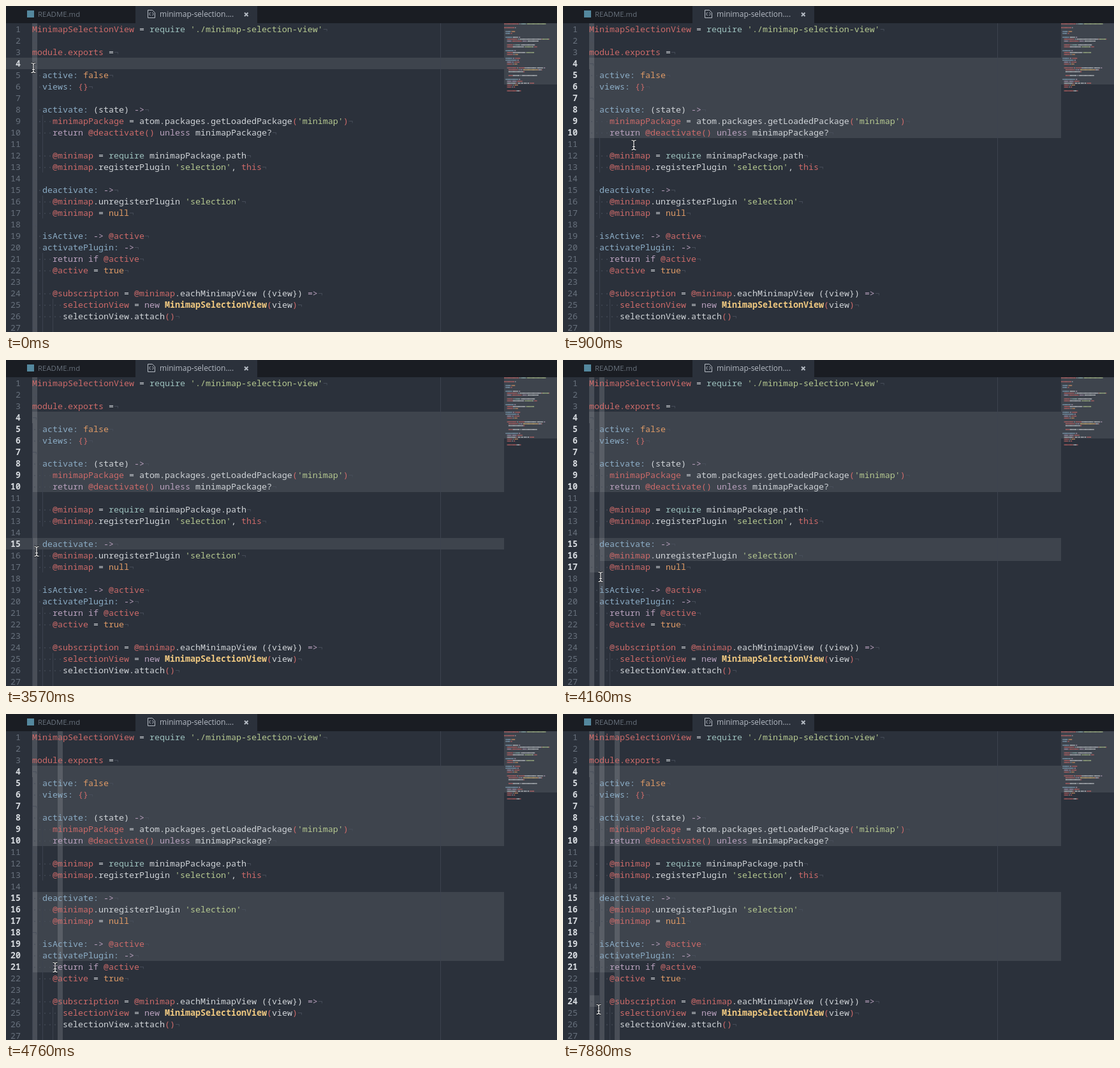
Animation of 864 by 511 pixels, one loop 8 s. Source, as an HTML page with a canvas:

```html
<!DOCTYPE html>
<html lang="en">
<head>
<meta charset="utf-8">
<title>Editor selections</title>
<style>
  html, body { margin: 0; width: 100%; height: 100%; overflow: hidden; background: #2b313b; }
  #stage { position: relative; width: 864px; height: 511px; overflow: hidden; background: #2b313b; }
  #stage * { position: absolute; left: 0; top: 0; margin: 0; }
  #stage pre * { position: static; }
  #stage > pre { top: 27px; font: 13.333px/18px 'Noto Sans Mono', monospace; color: #d0d4d8; }
  #tabs { width: 864px; height: 27px; background: #1a1d23; font: 12px/26px 'Open Sans', sans-serif; white-space: nowrap; }
  #stage #badge { left: 33px; top: 7px; width: 11px; height: 11px; background: #54889e; }
  #stage #readme { left: 50px; font-size: 11.4px; color: #69727d; }
  #stage #tab { left: 203px; width: 191px; height: 27px; background: #2b313b; color: #b4bac3; }
  #stage #title { left: 38px; }
  #tab svg { fill: none; stroke: #b4bac3; }
  #stage #numbers { left: 7px; color: #68717d; }
  #numbers b { color: #d5d9de; }
  #stage #code { left: 41px; }
  #stage #map { left: 781px; top: 27px; }
  .hl { background: #fff; opacity: .09; }
  .column { background: #fff; opacity: .14; }
  .guide { width: 1px; background: #3c424e; }
  .str { color: #b5c890; }
  .red { color: #cc6a69; }
  .word { color: #b8a0bd; }
  .fn { color: #9cc0bd; }
  .key { color: #8bacc5; }
  .lit { color: #de9a66; }
  .type { color: #f0c981; font-weight: bold; }
  .inv { color: #484f5b; }
</style>
</head>
<body>
<div id="stage">
  <div id="marks"></div>
  <div id="guides"></div>
  <pre id="numbers"></pre>
  <pre id="code"></pre>
  <div class="hl" style="left:781px;top:27px;width:83px;height:96px"></div>
  <canvas id="map" width="83" height="484"></canvas>
  <div id="tabs">
    <span id="badge"></span><span id="readme">README.md</span>
    <div id="tab">
      <svg width="191" height="27">
        <path d="M19.5 6.5h7l4 4v8h-11zM23.5 10l-2 2.5 2 2.5M26.5 10l2 2.5-2 2.5"/>
        <path d="M171 10.5l5.5 5.5M176.5 10.5l-5.5 5.5" stroke-width="2"/>
      </svg>
      <span id="title">minimap-selection....</span>
    </div>
  </div>
  <svg id="pointer" width="20" height="24" viewBox="-10 -12 20 24" fill="none">
    <defs><path id="beam" d="M-3.5-7.5Q0-7.5 0-5V5Q0 7.5-3.5 7.5M3.5-7.5Q0-7.5 0-5M0 5Q0 7.5 3.5 7.5M-2 2.5H2"/></defs>
    <use href="#beam" stroke="#15181d" stroke-width="2.8"/>
    <use href="#beam" stroke="#fff" stroke-width="1.2"/>
  </svg>
</div>
<script>
const LOOP = 8000, TICK = 148.6;
const LEFT = 41, TOP = 27, CHAR = 8, LINE = 18, RIGHT = 781, HEIGHT = 484, VISIBLE = 27;
const $ = id => document.getElementById(id);

const source = `MinimapSelectionView = require './minimap-selection-view'

module.exports =

  active: false
  views: {}

  activate: (state) ->
    minimapPackage = atom.packages.getLoadedPackage('minimap')
    return @deactivate() unless minimapPackage?

    @minimap = require minimapPackage.path
    @minimap.registerPlugin 'selection', this

  deactivate: ->
    @minimap.unregisterPlugin 'selection'
    @minimap = null

  isActive: -> @active
  activatePlugin: ->
    return if @active
    @active = true

    @subscription = @minimap.eachMinimapView ({view}) =>
      selectionView = new MinimapSelectionView(view)
      selectionView.attach()

      @views[view.id] = selectionView.element

  deactivatePlugin: ->
    return unless @active
    view.destroy() for id, view of @views
    @active = false
    @views = {}

    @subscription.off()`.split('\n');

const syntax = new RegExp([
  "(?<str>'[^']*')",
  "(?<type>(?<=new )\\w+)",
  "(?<word>\\b(?:return|if|unless|new)\\b|[-=]>)",
  "(?<fn>\\brequire\\b)",
  "(?<key>\\w+:)",
  "(?<lit>\\b(?:true|false|null)\\b)",
  "(?<red>@\\w+|\\bthis\\b|^ *[\\w.]+(?= =)|\\{\\}|\\(\\)|(?<=\\w)\\(|\\)$)"
].join('|'), 'g');

const indent = line => line.search(/\S|$/);

// Splits a line into [kind, text, column] pieces.
function tokens(line) {
  const out = [];
  let end = indent(line);
  for (const m of line.matchAll(syntax)) {
    const text = m[0].trimStart(), col = m.index + m[0].length - text.length;
    if (col > end) out.push(['', line.slice(end, col), end]);
    out.push([Object.keys(m.groups).find(k => m.groups[k]), text, col]);
    end = col + text.length;
  }
  if (end < line.length) out.push(['', line.slice(end), end]);
  return out;
}

const span = (kind, text) => `<span class="${kind}">${text.replace(/>/g, '&gt;')}</span>`;
const box = (kind, x, y, w, h) =>
  `<div class="${kind}" style="left:${x}px;top:${y}px;width:${w}px;height:${h}px"></div>`;
const rowTop = row => TOP + (row - 1) * LINE;

$('code').innerHTML = source.slice(0, VISIBLE).map(line =>
  span('inv', '·'.repeat(indent(line))) +
  tokens(line).map(([kind, text]) => span(kind, text)).join('') + span('inv', '¬')
).join('\n');

// Blank lines take the smaller depth of their neighbours.
const depth = i => (source[i]
  ? indent(source[i])
  : Math.min(indent(source[i - 1]), indent(source[i + 1]))) / 2;
let guides = box('guide', LEFT + 80 * CHAR, TOP, 1, HEIGHT);
for (let i = 0; i < VISIBLE; i++)
  for (let d = 0; d < depth(i); d++)
    guides += box('guide', LEFT + d * 2 * CHAR, rowTop(i + 1), 1, LINE);
$('guides').innerHTML = guides;

const map = $('map').getContext('2d');
map.globalAlpha = .6;
source.forEach((line, row) => {
  for (const [kind, text, col] of tokens(line)) {
    const sample = kind ? document.querySelector('#code .' + kind) : $('code');
    map.fillStyle = getComputedStyle(sample).color;
    [...text].forEach((c, i) => {
      if (c !== ' ') map.fillRect((col + i) * 1.15, row * 3, 1.15, 2);
    });
  }
});

// Pointer key points: tick, x, y
const path = [
  [0, 43, 97], [2, 62, 118], [3, 62, 118], [6, 111, 218], [9, 111, 218], [10, 109, 220], [11, 109, 220],
  [15, 59, 268], [18, 48, 285], [20, 44, 288], [23, 44, 288], [25, 52, 312], [26, 52, 312],
  [28, 59, 340], [32, 77, 397], [35, 77, 397], [41, 48, 435], [47, 48, 435], [48, 48, 440], [53, 56, 463]
];
const drags = [[0, 6], [24, 32], [51, 53]]; // press and release ticks

function pointer(tick) {
  const i = path.findIndex(key => key[0] >= tick);
  if (i < 1) return path.at(i).slice(1);
  const [t0, x0, y0] = path[i - 1], [t1, x1, y1] = path[i];
  const k = (tick - t0) / (t1 - t0);
  return [x0 + (x1 - x0) * k, y0 + (y1 - y0) * k];
}

// Text position under the tip of the pointer, kept within its line.
function caret(tick) {
  const [x, y] = pointer(tick);
  const row = Math.floor((y - 8 - TOP) / LINE) + 1;
  return [row, Math.min(Math.round((x - LEFT) / CHAR), source[row - 1].length)];
}

let shown;
function draw(now) {
  requestAnimationFrame(draw);
  const tick = Math.floor(now % LOOP / TICK);
  if (tick === shown) return;
  shown = tick;

  let marks = '';
  const bright = new Set(), columns = new Set();
  for (const [press, release] of drags) {
    if (tick < press) continue;
    const [first] = caret(press);
    if (tick === press) {
      marks += box('hl', 0, rowTop(first), RIGHT, LINE);
      bright.add(first);
      columns.add(0);
      continue;
    }
    const [row, col] = caret(Math.min(tick, release));
    marks += box('hl', LEFT, rowTop(first), RIGHT - LEFT, (row - first) * LINE);
    marks += box('hl', LEFT, rowTop(row), col * CHAR, LINE);
    for (let r = first; r < row + (col > 0); r++) bright.add(r);
    columns.add(col);
  }
  for (const col of columns) marks += box('column', LEFT + col * CHAR, TOP, CHAR, HEIGHT);
  $('marks').innerHTML = marks;

  $('numbers').innerHTML = Array.from({ length: VISIBLE }, (_, i) => {
    const label = String(i + 1).padStart(2);
    return bright.has(i + 1) ? `<b>${label}</b>` : label;
  }).join('\n');

  const [x, y] = pointer(tick);
  $('pointer').style.transform = `translate(${Math.round(x) - 10}px, ${Math.round(y) - 12}px)`;
}
draw(0);
</script>
</body>
</html>
```
